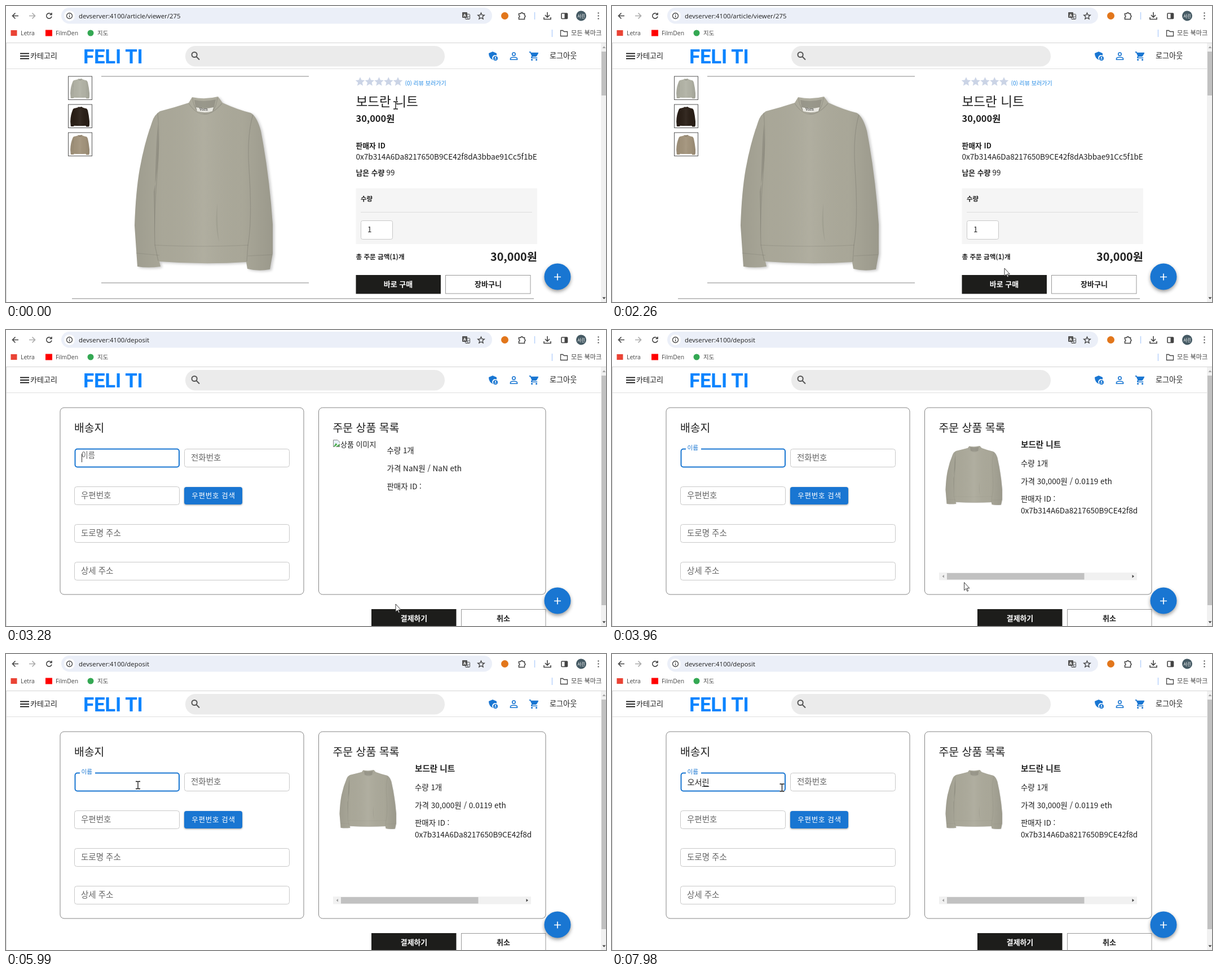
Write an HTML page that moves like this. It is 1064 by 526 pixels and loops after 8000 ms.

```html
<!DOCTYPE html>
<html lang="ko">
<head>
<meta charset="utf-8">
<style>
  html, body { margin: 0; width: 100%; height: 100%; overflow: hidden; background: #fff; }
  svg { display: block; }
  text { font: 13.4px "Noto Sans CJK KR", "Noto Sans CJK", sans-serif; fill: #1f1f1f; white-space: pre; }
  .ui text { font-family: "Open Sans", "Noto Sans CJK KR", sans-serif; fill: #474747; }
  .b { font-weight: 700; }
  .hint { fill: #666; font-size: 14.5px; }
  .wallet { font-size: 13.6px; }
  .w { fill: #fff; }
  .mid { text-anchor: middle; }
  .line { fill: none; stroke: #444; stroke-width: 1.6; }
  .blue { fill: none; stroke: #1976d2; stroke-width: 1.6; }
  .field { fill: #fff; stroke: #c8c8c8; }
  .card { fill: #fff; stroke: #858585; }
  .button { fill: #fff; stroke: #999; }
  .rule { stroke: #858585; }
</style>
</head>
<body>
<svg width="1064" height="526">
  <defs>
    <linearGradient id="shade">
      <stop offset="0" stop-color="#000" stop-opacity=".08"/>
      <stop offset=".2" stop-color="#000" stop-opacity=".02"/>
      <stop offset=".5" stop-color="#fff" stop-opacity=".05"/>
      <stop offset=".78" stop-color="#000" stop-opacity=".02"/>
      <stop offset="1" stop-color="#000" stop-opacity=".1"/>
    </linearGradient>
    <path id="body" d="M330 162Q353 167 376 161L384 172Q410 184 434 190Q445 196 452 222Q467 300 473 388L473 440L468 468Q448 472 428 467L426 455Q350 460 272 454L274 463Q252 466 233 463L228 390Q230 330 237 290Q245 245 259 206Q263 193 273 187Q300 180 324 172Z"/>
    <g id="knit">
      <use href="#body" fill="currentColor"/>
      <use href="#body" fill="url(#shade)"/>
      <path d="M334 167Q353 171 372 166L368 185Q353 193 337 185Z" fill="#000" opacity=".13"/>
      <g fill="none" stroke="#000" stroke-opacity=".11" stroke-width="1.3">
        <path d="M324 173Q350 212 383 173M331 164Q333 188 352 191T375 163"/>
        <path d="M269 190Q273 235 268 300Q262 370 264 425L270 453M438 193Q427 230 431 290Q437 380 429 425L427 454"/>
        <path d="M264 425Q350 429 430 425M230 439L272 443M429 444L472 442" stroke-opacity=".07"/>
      </g>
      <path d="M262 330Q274 270 269 210Q263 290 264 420Z" fill="#000" opacity=".12"/>
      <path d="M378 420Q369 390 375 350Q374 390 378 420Z" fill="#000" opacity=".06"/>
    </g>
    <path id="star" d="M0-8.3L2.4-2.9L8.2-2.4L3.8 1.5L5.1 7.2L0 4.2L-5.1 7.2L-3.8 1.5L-8.2-2.4L-2.4-2.9Z"/>
  </defs>

  <!-- browser bar -->
  <g class="ui">
    <rect x="98" y="3" width="764" height="28.5" rx="14.2" fill="#ebeff8"/>
    <path class="line" d="M22 17.5H12M16.5 12.5L11.5 17.5L16.5 22.5"/>
    <path class="line" style="stroke:#aaa" d="M41 17.5H51M46.5 12.5L51.5 17.5L46.5 22.5"/>
    <path class="line" d="M80 14.5A4.7 4.7 0 1 0 81 18.5M81 12V15.5H77.5"/>
    <circle cx="112.5" cy="17.5" r="9.5" fill="#fff"/>
    <circle class="line" cx="112.5" cy="17.5" r="5" style="stroke-width:1.3"/>
    <path class="line" d="M112.5 16.8V20.3M112.5 14.5V15.8" style="stroke-width:1.3"/>
    <text id="url" x="129" y="22" style="font-size:11.4px;fill:#1f1f1f"></text>
    <rect x="809" y="11" width="9" height="10" rx="1" fill="#555"/>
    <rect class="line" x="814.5" y="14.5" width="8" height="9" rx="1" style="stroke-width:1"/>
    <text x="811" y="19" class="b" style="font-size:7px;fill:#fff">A</text>
    <text x="816" y="22" style="font-size:6px">文</text>
    <use href="#star" class="line" transform="translate(842.5 18) scale(.7)" style="stroke-width:2"/>
    <circle cx="884.5" cy="17.5" r="6.5" fill="#e2761b"/>
    <path class="line" d="M909.5 13.5H913A1.8 1.8 0 0 1 916.6 13.5H919.5V16.5A1.8 1.8 0 0 1 919.5 20V23.5H909.5V20A1.8 1.8 0 0 0 909.5 16.5Z"/>
    <path d="M937.5 11V24M968.5 42V55" stroke="#b9d3fb" stroke-width="1.5"/>
    <path class="line" d="M960 11V19.5M956 16L960 20L964 16M954 20V23.5H966V20"/>
    <rect class="line" x="985" y="13" width="10.5" height="9.5" rx="1"/>
    <rect x="990.5" y="13" width="5" height="9.5" fill="#444"/>
    <circle cx="1020" cy="17.5" r="9" fill="#455a64"/>
    <text x="1020" y="20.5" class="mid" style="font-size:7.5px;fill:#fff">서린</text>
    <path d="M1049.5 11.5h2v2h-2zm0 5h2v2h-2zm0 5h2v2h-2z" fill="#444"/>
    <rect x="8.5" y="43" width="11" height="10" fill="#ea4335"/>
    <text x="26" y="52" style="font-size:10.5px">Letra</text>
    <rect x="70" y="42.5" width="12" height="11" fill="#f00"/>
    <text x="88" y="52" style="font-size:10.4px">FilmDen</text>
    <circle cx="150" cy="48" r="5.5" fill="#34a853"/>
    <text x="162" y="52" style="font-size:10.5px">지도</text>
    <path class="line" style="stroke-width:1.3" d="M983.5 43.5H987.5L989.5 45.5H995.5V53.5H983.5Z"/>
    <text x="1002" y="52" style="font-size:11.2px">모든 북마크</text>
  </g>

  <!-- shop header -->
  <path d="M0 65.5H1064M.5 66V526" stroke="#d4d4d4"/>
  <path d="M1 111.5H1055" stroke="#e0e0e0"/>
  <path d="M25 84.5H41M25 89H41M25 93.5H41" stroke="#222" stroke-width="1.9"/>
  <text x="43" y="93" style="font-size:13px">카테고리</text>
  <text x="137" y="102" style="font:700 35px Roboto,sans-serif;letter-spacing:-.3px;fill:#0a84ff">FELI TI</text>
  <rect x="318" y="71" width="460" height="36.5" rx="18" fill="#ebebeb"/>
  <path class="line" d="M338.7 86.5A4.6 4.6 0 1 1 329.5 86.5A4.6 4.6 0 1 1 338.7 86.5M337.5 90L343 95.5" style="stroke:#555;stroke-width:2"/>
  <path d="M863 81L870 84V88A5 5 0 0 0 864.5 96.5Q856 93 856 84Z" fill="#1976d2"/>
  <circle cx="868" cy="93" r="4" fill="#1976d2"/>
  <circle cx="868" cy="91.8" r="1.2" fill="#fff"/>
  <path d="M865.8 95Q868 92.5 870.2 95Z" fill="#fff"/>
  <circle class="blue" cx="900.5" cy="85.5" r="2.7"/>
  <path class="blue" d="M894.5 95.2V93.5Q895 91 900.5 91T906.5 93.5V95.2Z"/>
  <path transform="translate(927 79.5) scale(.8)" fill="#1976d2" d="M7 18c-1.1 0-2 .9-2 2s.9 2 2 2 2-.9 2-2-.9-2-2-2zM1 2v2h2l3.6 7.6-1.35 2.45C4.5 15.4 5.5 17 7 17h12v-2H7.4l1.1-2h7.45c.75 0 1.4-.4 1.75-1l3.6-6.5c.4-.7-.1-1.5-.9-1.5H5.2l-.9-2H1zm16 16c-1.1 0-2 .9-2 2s.9 2 2 2 2-.9 2-2-.9-2-2-2z"/>
  <text x="964" y="93" style="font-size:13.1px">로그아웃</text>

  <!-- product page -->
  <g id="product">
    <g fill="#fff" stroke="#555">
      <rect x="110.5" y="125" width="42" height="41.5"/>
      <rect x="110.5" y="175" width="42" height="41.5"/>
      <rect x="110.5" y="225" width="42" height="41.5"/>
    </g>
    <use href="#knit" color="#b2b3a6" transform="translate(82.7 110.5) scale(.138 .115)"/>
    <use href="#knit" color="#2b2018" transform="translate(82.7 160.5) scale(.138 .115)"/>
    <use href="#knit" color="#a3947c" transform="translate(82.7 210.5) scale(.138 .115)"/>
    <path class="rule" d="M169 125H537M169 492H537M117 520H936"/>
    <use href="#knit" color="#acaa9b" style="filter:drop-shadow(3px 2px 2px #0003)"/>
    <path d="M337 180Q352 184 368 180L366 187Q352 191 339 187Z" fill="#e9e8e2"/>
    <text x="343" y="186" style="font:6.5px 'Noto Serif',serif">Vorn</text>
    <g fill="#cbd4e6">
      <use href="#star" x="628" y="134.5"/><use href="#star" x="644.8" y="134.5"/>
      <use href="#star" x="661.5" y="134.5"/><use href="#star" x="678.3" y="134.5"/>
      <use href="#star" x="695" y="134.5"/>
    </g>
    <text x="707.5" y="140.5" style="font-size:10px;fill:#1e88e5">(0) 리뷰 보러가기</text>
    <text x="620.5" y="178" style="font-size:22.6px">보드란 니트</text>
    <text x="620.5" y="206" class="b" style="font-size:16.4px">30,000원</text>
    <text x="620.5" y="252.5" class="b" style="font-size:12.8px">판매자 ID</text>
    <text x="620.5" y="273" class="wallet"></text>
    <text x="620.5" y="301" class="b" style="font-size:12.8px">남은 수량</text>
    <text x="674.5" y="301">99</text>
    <rect x="620.5" y="324" width="321.5" height="99" fill="#f5f5f5"/>
    <text x="629" y="346.5" class="b" style="font-size:11.4px">수량</text>
    <path d="M629 366.5H933" stroke="#ddd"/>
    <rect class="field" x="629.5" y="381.5" width="56" height="33" rx="3"/>
    <text x="641" y="402">1</text>
    <text x="620.5" y="450" class="b" style="font-size:11.6px">총 주문 금액(1)개</text>
    <text x="942" y="452.5" class="b" text-anchor="end" style="font-size:19.8px">30,000원</text>
    <rect x="620.5" y="478" width="150.5" height="33.5" fill="#1d1d1b"/>
    <text x="695.5" y="499" class="b w mid" style="font-size:13px">바로 구매</text>
    <rect class="button" x="779.5" y="478.5" width="150.5" height="32.5"/>
    <text x="855" y="499" class="b mid" style="font-size:13px">장바구니</text>
  </g>

  <!-- payment page -->
  <g id="payment">
    <rect class="card" x="96" y="138" width="432" height="332" rx="7"/>
    <rect class="card" x="554.5" y="138" width="402.5" height="332" rx="7"/>
    <text x="121" y="181" style="font-size:19.3px">배송지</text>
    <text x="579.5" y="181" style="font-size:19.4px">주문 상품 목록</text>
    <rect x="122.5" y="211.5" width="184.5" height="32" rx="4" fill="#fff" stroke="#1976d2" stroke-width="2"/>
    <rect id="notch" x="131" y="209" height="5" fill="#fff"/>
    <text id="label">이름</text>
    <text id="typed" x="133.5" y="233" style="font-size:14.2px"></text>
    <rect id="under" y="235" width="12.5" height="1" fill="#333"/>
    <rect id="caret" y="220" width="1" height="15" fill="#333"/>
    <rect class="field" x="316.5" y="211.5" width="186" height="32" rx="4"/>
    <text class="hint" x="328" y="232">전화번호</text>
    <rect class="field" x="121.5" y="278.5" width="186" height="32" rx="4"/>
    <text class="hint" x="133" y="299">우편번호</text>
    <rect x="316" y="279" width="103" height="31" rx="4" fill="#1976d2" style="filter:drop-shadow(0 1.5px 1.5px #0006)"/>
    <text class="w mid" x="368" y="298.5" style="font-size:12.5px;letter-spacing:.7px">우편번호 검색</text>
    <rect class="field" x="121.5" y="345.5" width="381" height="32" rx="4"/>
    <text class="hint" x="133" y="366">도로명 주소</text>
    <rect class="field" x="121.5" y="412.5" width="381" height="32" rx="4"/>
    <text class="hint" x="133" y="433">상세 주소</text>
    <g id="empty">
      <path d="M580.5 195.5H588L591.5 199V207.5H580.5Z" fill="#e8f0fb" stroke="#888"/>
      <path d="M581 207L585 201L588 204L591 201V207Z" fill="#4caf50"/>
      <path d="M582 209L593 200" stroke="#fff" stroke-width="1.5"/>
      <text x="593" y="207.5" style="font-size:13px">상품 이미지</text>
      <text x="675.5" y="219">수량 1개</text>
      <text x="675.5" y="251" style="font-size:13.5px">가격 NaN원 / NaN eth</text>
      <text x="675.5" y="283">판매자 ID :</text>
    </g>
    <g id="loaded">
      <use href="#knit" color="#acaa9b" transform="translate(498 151.3) scale(.41 .34)" style="filter:drop-shadow(1px 1px 1px #0003)"/>
      <text x="725" y="209" class="b" style="font-size:14.6px">보드란 니트</text>
      <text x="725" y="242">수량 1개</text>
      <text x="725" y="274" style="font-size:13.6px">가격 30,000원 / 0.0119 eth</text>
      <text x="725" y="305">판매자 ID :</text>
      <svg width="931" height="526"><text x="725" y="326" class="wallet"></text></svg>
      <rect x="580" y="431" width="351" height="13.5" fill="#f1f1f1"/>
      <rect id="thumb" x="594" y="432" width="243.5" height="11.5"/>
      <path d="M589 435V440.5L585.5 437.7Z" fill="#a3a3a3"/>
      <path d="M922.5 435V440.5L926 437.7Z" fill="#444"/>
    </g>
    <rect x="648" y="496" width="150.5" height="34" fill="#1d1d1b"/>
    <text x="723.5" y="516.5" class="b w mid" style="font-size:12.9px">결제하기</text>
    <rect class="button" x="807.5" y="496.5" width="149.5" height="34"/>
    <text x="882" y="516.5" class="b mid" style="font-size:13px">취소</text>
  </g>

  <!-- floating button and page scrollbar -->
  <circle cx="978" cy="481" r="23.5" fill="#1976d2" style="filter:drop-shadow(0 3px 3px #0006)"/>
  <path d="M972 481.5H984M978 475.5V487.5" stroke="#fff" stroke-width="1.7"/>
  <rect x="1055" y="66" width="9" height="460" fill="#f1f1f1"/>
  <rect id="bar" x="1056" y="81" width="8" fill="#c1c1c1"/>
  <path d="M1057.5 75L1060.5 71.5L1063.5 75Z" fill="#a3a3a3"/>
  <path d="M1057.5 517.5L1060.5 521L1063.5 517.5Z" fill="#444"/>

  <!-- pointers -->
  <g id="pointer">
    <path id="arrow" d="M0 0V14L3.2 11L5.4 15.8L7.2 15L5 10.3H9.3Z" fill="#fff" stroke="#222" stroke-width=".9"/>
    <g id="beam" fill="none">
      <path d="M-4-6.5H4M0-6.5V6.5M-4 6.5H4" stroke="#fff" stroke-width="3"/>
      <path d="M-4-6.5H-1L0-6L1-6.5H4M0-6V6M-4 6.5H-1L0 6L1 6.5H4" stroke="#111" stroke-width="1.3"/>
    </g>
    <path id="hand" d="M-1 1Q.5-.5 2 1V6Q3 5 4 6.2Q5.3 5.5 6 6.8Q8 6 8 8.5V12L6.5 16.5H0L-3.5 11Q-5 8.5-3 8.5L-1 10Z" fill="#fff" stroke="#222" stroke-width=".9"/>
  </g>
</svg>
<script>
const $ = id => document.getElementById(id);
const show = (id, on) => $(id).style.display = on ? "" : "none";
const set = (id, attrs) => { for (const k in attrs) $(id).setAttribute(k, attrs[k]); };

const LOOP = 8000, STEP = 70, PAY = 3280, ADVANCE = 13.06;

// pointer moves: start time, number of steps, destination
const moves = [
  [200, 11, 851, 248], [1160, 2, 850, 257], [1490, 1, 849, 254], [1560, 11, 696, 466],
  [2330, 5, 690, 486], [3070, 1, 686, 480], [3140, 1, 691, 487],
  [3820, 12, 266, 241], [4660, 1, 252.5, 238.5], [4730, 1, 234, 233], [7840, 3, 301.5, 237.5]
];
// zones as left, top, right, bottom
const zones = {
  product: { beam: [[621, 158, 730, 182], [621, 259, 942, 277]], hand: [[621, 478, 771, 511]] },
  payment: {
    beam: [[122, 211, 307, 244], [316, 211, 503, 244], [122, 278, 307, 311], [122, 345, 503, 378], [122, 412, 503, 445]],
    hand: [[316, 279, 419, 310]]
  }
};
const keys = [[6520, "ㅇ"], [6780, "오"], [6920, "옷"], [7020, "오서"], [7110, "오설"], [7210, "오서리"], [7310, "오서린"]];

document.querySelectorAll(".wallet").forEach(e => e.textContent = "0x7b314A6Da8217650B9CE42f8dA3bbae91Cc5f1bE");

const inside = (x, y, [l, t, r, b]) => x >= l && x <= r && y >= t && y <= b;

function pointerAt(t) {
  let x = 691, y = 176.5;
  for (const [start, steps, toX, toY] of moves) {
    if (t < start) break;
    const p = Math.min(1, (Math.floor((t - start) / STEP) + 1) / steps);
    const e = p * p * (3 - 2 * p);
    x += (toX - x) * e;
    y += (toY - y) * e;
  }
  return [x, y];
}

function drawPointer(t, page) {
  const [x, y] = pointerAt(t);
  const over = kind => zones[page][kind].some(z => inside(x, y, z));
  const shape = over("hand") ? "hand" : over("beam") ? "beam" : "arrow";
  for (const s of ["arrow", "beam", "hand"]) show(s, s === shape);
  set("pointer", { transform: `translate(${x} ${y})` });
  set("thumb", { fill: inside(x, y, [594, 431, 837, 444]) ? "#a8a8a8" : "#c1c1c1" });
}

function drawNameField(t) {
  const float = 1 - (1 - Math.min(1, Math.max(0, (t - 3250) / 200))) ** 2;
  set("label", { x: 133.5, y: 232 - 19 * float });
  $("label").style.fontSize = 14.4 - 3.8 * float + "px";
  $("label").style.fill = t < 3340 ? "#666" : "#1976d2";
  set("notch", { width: t < 3340 ? 0 : 27 * float });

  const text = keys.reduce((s, [at, value]) => t >= at ? value : s, "");
  $("typed").textContent = text;
  show("under", text);
  set("under", { x: 133.5 + ADVANCE * (text.length - 1) });
  const blink = Math.floor((t - 4930) / 530) & 1;
  show("caret", t < 3870 || (text ? t < 7840 : blink));
  set("caret", { x: Math.round(133.5 + ADVANCE * text.length) });
}

function draw(now) {
  const t = now % LOOP, paying = t >= PAY;
  show("product", !paying);
  show("payment", paying);
  show("empty", t < 3410);
  show("loaded", t >= 3410);
  $("url").textContent = "devserver:4100/" + (paying ? "deposit" : "article/viewer/275");
  set("bar", { height: paying ? 408 : 78 });
  drawNameField(t);
  drawPointer(t, paying ? "payment" : "product");
  requestAnimationFrame(draw);
}
draw(performance.now());
</script>
</body>
</html>
```
